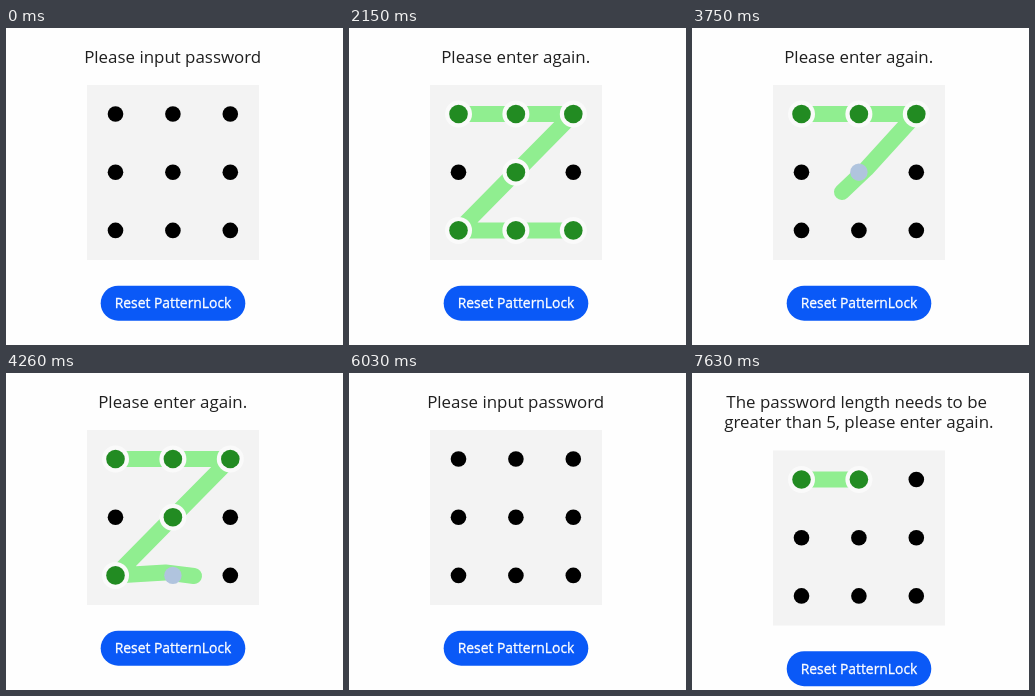
An HTML page for the animation above (8 s loop, 337 px wide and 317 px high).

```html
<!DOCTYPE html>
<html lang="en">
<head>
<meta charset="utf-8">
<title>Pattern lock</title>
<style>
html, body { margin: 0; width: 100%; height: 100%; overflow: hidden; background: #fefefe; }
svg { display: block; width: 337px; height: 317px; }
text { font-family: "Open Sans", "Noto Sans", sans-serif; text-anchor: middle; }
.msg { font-size: 16.9px; fill: #1f1f1f; }
.label { font-size: 13.9px; fill: #fff; stroke: #fff; stroke-width: 0.3px; }
</style>
</head>
<body>
<svg viewBox="0 0 337 317">
  <text class="msg" id="line1" y="35"></text>
  <text class="msg" id="line2" x="166.9" y="55"></text>
  <g id="lock">
    <rect x="81" y="57" width="172" height="175" fill="#f3f3f3"/>
    <polyline id="trail" fill="none" stroke="#90ee90" stroke-width="16" stroke-linecap="round" stroke-linejoin="round"/>
    <g id="dots"></g>
    <rect x="94.7" y="257.7" width="144.6" height="35" rx="17.5" fill="#0a59f7"/>
    <text class="label" x="167" y="280">Reset PatternLock</text>
  </g>
</svg>
<script>
const LOOP = 8000;
const GREEN = '#228b22', BLUE = '#0a59f7', ACTIVE = '#b0c4de';
const MESSAGES = {
  input: ['Please input password', ''],
  again: ['Please enter again.', ''],
  done: ['Set password successfully: [0, 1, 2, 4,', '6, 7, 8]'],
  short: ['The password length needs to be', 'greater than 5, please enter again.']
};

// time, message, visited dots, finger x, y (no finger: stroke released)
const STEPS = [
  [0, 'input', ''],
  [500, 'input', '01', 186, 78],
  [650, 'input', '012', 249, 78],
  [880, 'input', '012', 196, 113],
  [980, 'input', '0124', 140, 169],
  [1030, 'input', '0124', 126, 183],
  [1160, 'input', '01246', 99, 206],
  [1530, 'input', '01246', 136, 203],
  [1580, 'input', '012467', 176, 202],
  [1630, 'input', '0124678', 222, 202],
  [1810, 'input', '0124678', 240, 207],
  [1890, 'again', '0124678'],
  [3230, 'again', '0', 112, 86],
  [3290, 'again', '0', 142, 86],
  [3360, 'again', '01', 186, 86],
  [3510, 'again', '012', 237, 88],
  [3650, 'again', '012', 198, 114],
  [3750, 'again', '0124', 150, 164],
  [3830, 'again', '0124', 131, 183],
  [3900, 'again', '01246', 113, 200],
  [3960, 'again', '01246', 109, 203],
  [4030, 'again', '01246', 118, 203],
  [4100, 'again', '01246', 138, 203],
  [4160, 'again', '012467', 163, 203],
  [4230, 'again', '012467', 188, 203],
  [4290, 'again', '0124678', 215, 203],
  [4350, 'again', '0124678', 226, 203],
  [4680, 'done', '0124678'],
  [6030, 'input', ''],
  [6830, 'input', '01', 198, 86],
  [6980, 'short', '01']
];

const $ = id => document.getElementById(id);
const place = i => [109.5 + 57.4 * (i % 3), 86 + 58.2 * Math.floor(i / 3)];

// Where the finger entered dot b on its way from a, a little off the straight line.
function entry([ax, ay], [bx, by]) {
  const angle = Math.atan2(ay - by, ax - bx) + 0.38;
  return [bx + 8 * Math.cos(angle), by + 8 * Math.sin(angle)];
}

function circle(x, y, fill) {
  const c = document.createElementNS('http://www.w3.org/2000/svg', 'circle');
  c.setAttribute('cx', x);
  c.setAttribute('cy', y);
  c.setAttribute('fill', fill);
  $('dots').appendChild(c);
  return c;
}

const dots = Array.from({ length: 9 }, (_, i) => {
  const [x, y] = place(i);
  return { ring: circle(x, y, '#fafafa'), core: circle(x, y, '#000') };
});

let shown = null;

function draw(t) {
  const step = STEPS.findLast(s => s[0] <= t);
  if (step === shown) return;
  shown = step;
  const [, msg, path, fx, fy] = step;
  const dragging = fx !== undefined;
  const visited = [...path].map(Number);
  const last = visited[visited.length - 1];

  // A wrapped first line keeps its trailing space, so it sits further left.
  const [top, below] = MESSAGES[msg];
  $('line1').textContent = top;
  $('line1').setAttribute('x', below ? 164.7 : 166.7);
  $('line2').textContent = below;
  $('lock').setAttribute('transform', `translate(0 ${below ? 20.5 : 0})`);

  const points = visited.map(place);
  if (dragging) {
    if (points.length > 1) points.push(entry(points.at(-2), points.pop()));
    points.push([fx, fy]);
  }
  $('trail').setAttribute('points', points.join(' '));

  dots.forEach(({ ring, core }, i) => {
    const on = visited.includes(i);
    const active = dragging && i === last;
    ring.setAttribute('r', on && !active ? 13.5 : 0);
    core.setAttribute('r', on ? (active ? 8.7 : 9.3) : 7.8);
    core.setAttribute('fill', active ? ACTIVE : on ? (msg === 'done' ? BLUE : GREEN) : '#000');
  });
}

const start = performance.now();
function tick() {
  draw((performance.now() - start) % LOOP);
  requestAnimationFrame(tick);
}
tick();
</script>
</body>
</html>
```
